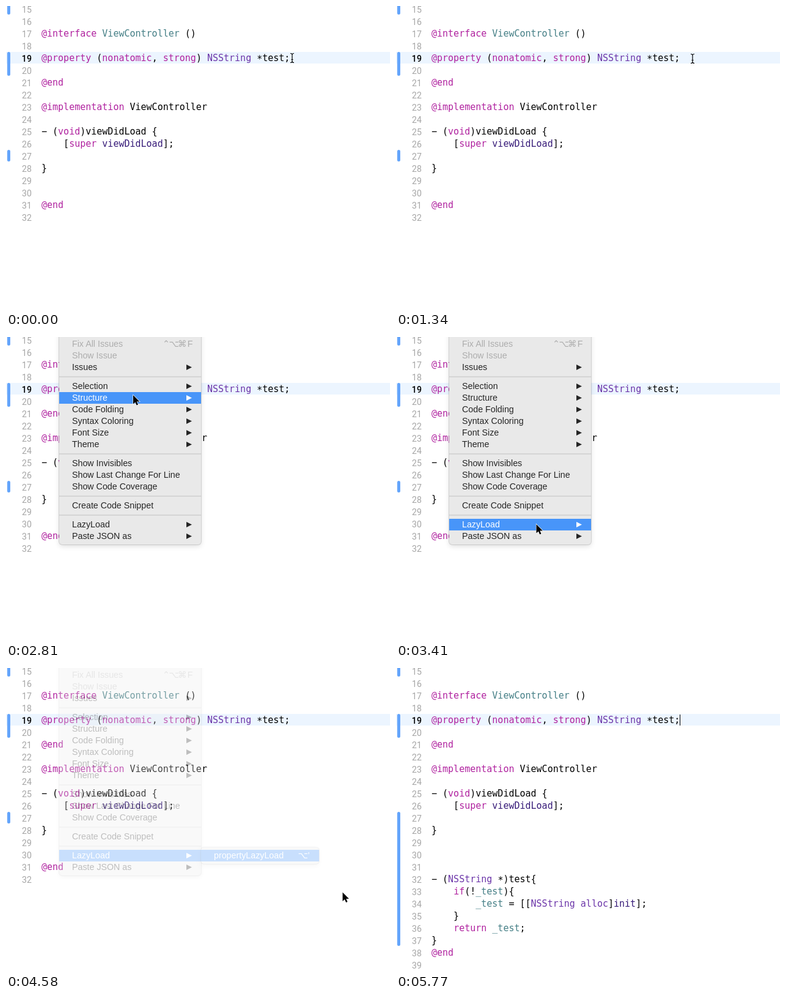
These frames come from a looping animation (628 px wide and 495 px high, 6.07 s). An HTML page:

```html
<!DOCTYPE html>
<html lang="en">
<head>
<meta charset="utf-8">
<title>Lazy getter from a menu</title>
<style>
  html, body { margin: 0; width: 100%; height: 100%; overflow: hidden; background: #fff; }
  #stage { position: relative; width: 628px; height: 495px; overflow: hidden; background: #fff; }
  #stage div, #stage svg { position: absolute; }
  .line { left: 58px; height: 20px; white-space: pre; color: #000;
    font: 15px/20px "DejaVu Sans Mono", monospace; }
  .line i { font-style: normal; position: relative; top: 2px; }
  .k { color: #b0229f; }
  .c { color: #457f86; }
  .t { color: #6c36a9; }
  .m { color: #361a78; }
  .num { left: 0; width: 42px; text-align: right; color: #a6a6a6;
    font: 14.2px/20px Roboto, sans-serif; }
  .num.on { color: #000; font-weight: 500; }
  .bar { left: 2px; width: 5px; border-radius: 2.5px; background: #64a5fb; }
  #band { left: 0; top: 75px; width: 628px; height: 19px; background: #ecf5ff; }
  #sel { left: 464px; top: 75px; width: 164px; height: 19px; background: #b3d7ff; }
  #caret { left: 464px; top: 76px; width: 1px; height: 18px; background: #000; }
  #menus { left: 0; top: 0; }
  .menu { background: #e9e9e9; border-radius: 5px;
    box-shadow: 0 0 0 1px rgba(0,0,0,.13), 0 3px 9px rgba(0,0,0,.13); }
  #main { left: 87px; top: -20px; width: 232px; height: 359px; }
  #sub { left: 319px; top: 293px; width: 193px; height: 27px; }
  .item { height: 19px; color: #262626; white-space: pre;
    font: 14.25px/19px "Liberation Sans", Arial, sans-serif; }
  .item span { position: absolute; left: 21px; }
  .item b { position: absolute; width: 20px; text-align: center; font-weight: normal;
    font-family: "Liberation Sans", "DejaVu Sans", sans-serif; }
  .item.off { color: #adadad; }
  .item.hot { color: #fff; background: #4895f9; }
  .item svg { left: 208px; top: 5px; fill: currentColor; }
  .rule { left: 87px; width: 232px; height: 2px; background: #d5d5d5; }
  #arrow, #beam { left: 0; top: 0; overflow: visible; }
</style>
</head>
<body>
<div id="stage">
  <div id="band"></div>
  <div id="sel"></div>
  <div id="code"></div>
  <div id="before"></div>
  <div id="after"></div>
  <div id="caret"></div>
  <div id="menus">
    <div class="menu" id="main"></div>
    <div id="items"></div>
    <div id="subwrap">
      <div class="menu" id="sub"></div>
      <div class="item" id="subitem" style="left:319px;top:297px;width:193px"><span>propertyLazyLoad</span><b style="left:157px">⌥</b><b style="left:166px">'</b></div>
    </div>
  </div>
  <svg id="beam" width="1" height="1"><path d="M-3 -7.5Q0 -7.5 0 -5.5Q0 -7.5 3 -7.5M0 -5.5V5.5M-3 7.5Q0 7.5 0 5.5Q0 7.5 3 7.5M-1.5 2.5H1.5" fill="none" stroke="#000" stroke-width="1.2"/></svg>
  <svg id="arrow" width="1" height="1"><path d="M0 0V14.5L3.4 11.4 5.6 16.6 8 15.6 5.8 10.5H10.4Z" stroke="#fff" stroke-width="1.2" paint-order="stroke"/></svg>
</div>
<script>
const LOOP = 6070;
const $ = id => document.getElementById(id);
const rowTop = n => 75 + 20 * (n - 19);

// {k:text} marks a coloured token
const paint = s => s
  .replace(/\{(\w):([^}]*)\}/g, '<span class="$1">$2</span>')
  .replace(/\*/g, '<i>*</i>');

const put = (box, html) => $(box).insertAdjacentHTML('beforeend', html);
const line = (box, n, s) =>
  put(box, `<div class="line" style="top:${rowTop(n)}px">${paint(s)}</div>`);
const number = (box, n) =>
  put(box, `<div class="num${n === 19 ? ' on' : ''}" style="top:${rowTop(n) + 1}px">${n}</div>`);
const bar = (box, y, h) =>
  put(box, `<div class="bar" style="top:${y}px;height:${h}px"></div>`);

line('code', 17, '{k:@interface} {c:ViewController} ()');
line('code', 19, '{k:@property} ({k:nonatomic}, {k:strong}) {t:NSString} *test;');
line('code', 21, '{k:@end}');
line('code', 23, '{k:@implementation} ViewController');
line('code', 25, '− ({k:void})viewDidLoad {');
line('code', 26, '    [{k:super} {m:viewDidLoad}];');
line('code', 28, '}');
line('before', 31, '{k:@end}');
[
  '− ({t:NSString} *)test{',
  '    {k:if}(!{c:_test}){',
  '        {c:_test} = [[{t:NSString} {t:alloc}]{m:init}];',
  '    }',
  '    {k:return} {c:_test};',
  '}',
  '{k:@end}'
].forEach((s, i) => line('after', 32 + i, s));
for (let n = 15; n < 40; n++) number(n < 33 ? 'code' : 'after', n);
bar('code', -6, 20);
bar('code', 75, 39);
bar('before', 235, 19);
bar('after', 235, 219);

// Menu groups; ">" opens a submenu, "~" is disabled
const groups = [
  ['~Fix All Issues', '~Show Issue', 'Issues>'],
  ['Selection>', 'Structure>', 'Code Folding>', 'Syntax Coloring>', 'Font Size>', 'Theme>'],
  ['Show Invisibles', 'Show Last Change For Line', 'Show Code Coverage'],
  ['Create Code Snippet'],
  ['LazyLoad>', 'Paste JSON as>']
];
const triangle = '<svg width="9" height="9"><path d="M0 0L9 4.5 0 9Z"/></svg>';
let y = 2;
groups.forEach((group, g) => {
  if (g) {
    put('items', `<div class="rule" style="top:${y + 5}px"></div>`);
    y += 12;
  }
  for (const name of group) {
    const keys = name.startsWith('~Fix')
      ? [...'⌃⌥⌘F'].map((c, i) => `<b style="left:${165 + 13 * i}px">${c}</b>`).join('') : '';
    put('items', `<div class="item${name[0] === '~' ? ' off' : ''}" style="left:87px;top:${y}px;width:232px">` +
      `<span>${name.replace(/[~>]/g, '')}</span>${keys}${name.endsWith('>') ? triangle : ''}</div>`);
    y += 19;
  }
});
const items = [...document.querySelectorAll('#items .item')];

// Pointer track: time, shape, x, y
const track = [
  [0, 'beam', 468, 85],
  [450, 'beam', 468, 98],
  [600, 'beam', 468, 112],
  [740, 'beam', 468, 117],
  [890, 'beam', 469, 113],
  [1040, 'beam', 473, 102],
  [1190, 'beam', 480, 91],
  [1340, 'beam', 485, 86],
  [1640, 'beam', 420, 54],
  [1790, 'beam', 228, 9],
  [1930, ''],
  [2520, 'arrow', 206, 61],
  [2810, 'arrow', 208, 95],
  [2960, 'arrow', 212, 152],
  [3110, 'arrow', 218, 222],
  [3260, 'arrow', 226, 284],
  [3410, 'arrow', 229.5, 306],
  [3560, 'arrow', 236, 308],
  [3700, 'arrow', 305, 308],
  [3850, 'arrow', 366, 308],
  [3990, 'arrow', 371, 308],
  [4140, 'arrow', 373.5, 307.5],
  [4580, 'arrow', 550.5, 366.5],
  [4730, 'beam', 562, 372],
  [5180, 'beam', 540, 382],
  [5330, 'beam', 410, 400],
  [5480, 'beam', 230, 419],
  [5620, 'beam', 89, 425],
  [5770, '']
];

const show = (id, on) => { $(id).style.display = on ? '' : 'none'; };

function draw(t) {
  const within = (a, b) => t >= a && t < b;
  const [, shape, px, py] = track.findLast(k => k[0] <= t);
  for (const id of ['beam', 'arrow']) {
    show(id, shape === id);
    if (shape === id) $(id).style.transform = `translate(${px}px,${py}px)`;
  }

  const selected = within(150, 1190);
  show('sel', selected);
  show('band', !selected);
  show('caret', within(2370, 2520) || within(2960, 3410) || within(3700, 4140) || t >= 5770);

  show('before', t < 4730);
  show('after', t >= 4730);

  const open = within(2520, 4730);
  show('menus', open);
  if (!open) return;
  $('menus').style.opacity = t < 4580 ? 1 : 0.3;
  show('subwrap', t >= 3560);
  $('subitem').classList.toggle('hot', t >= 3700);
  for (const item of items) {
    const top = item.offsetTop;
    const hot = t < 3410 ? py >= top && py < top + 19 : item === items[13];
    item.classList.toggle('hot', hot);
  }
}

const start = performance.now();
function tick() {
  draw((performance.now() - start) % LOOP);
  requestAnimationFrame(tick);
}
tick();
</script>
</body>
</html>
```
